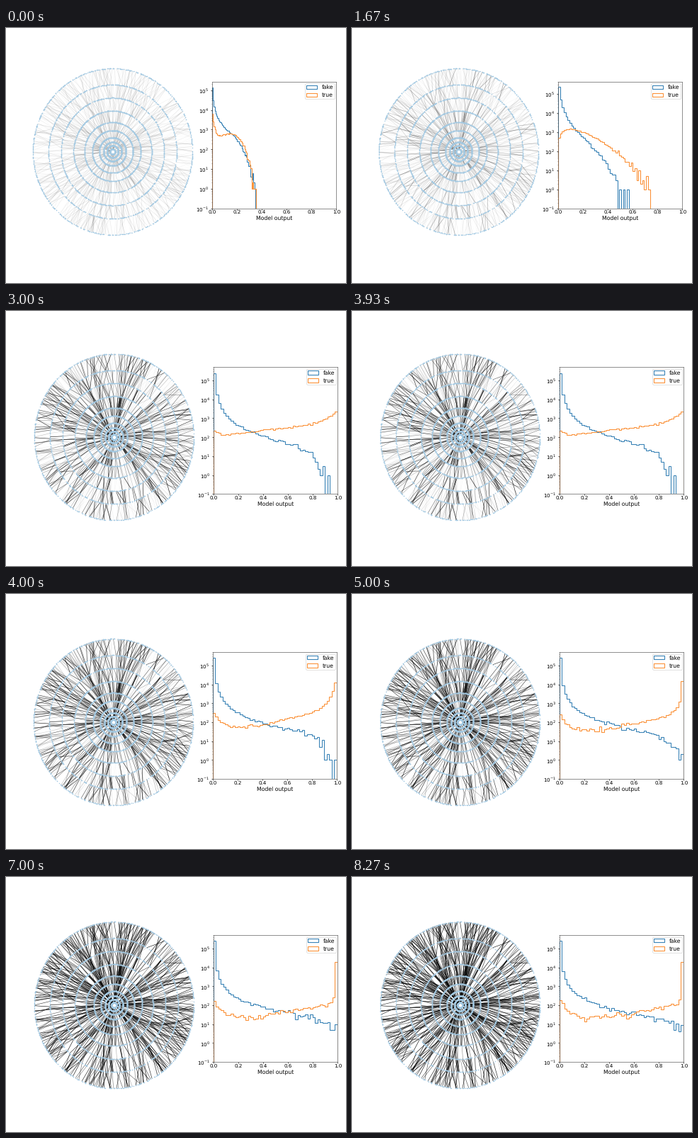
Animation, 480 px wide and 360 px high, one loop 8940 ms. Source, as a matplotlib script:

```python
import numpy as np
import matplotlib.pyplot as plt
from matplotlib.animation import FuncAnimation
from matplotlib.collections import LineCollection
from matplotlib.patches import Patch

W, H = 480, 360
STEP, FRAMES = 60, 149
EPOCHS, BINS = 9, 50

# At 72 dpi one point is one pixel.
plt.rcParams.update({
    "font.family": "DejaVu Sans", "font.size": 7.75, "text.hinting": "none",
    "xtick.labelsize": 7.1, "ytick.labelsize": 7.1,
    "axes.linewidth": 0.65, "axes.edgecolor": "#555555",
    "axes.labelpad": 0.8, "patch.linewidth": 0.7,
    "xtick.major.size": 1.6, "ytick.major.size": 1.6,
    "xtick.major.width": 0.65, "ytick.major.width": 0.65,
    "xtick.major.pad": 0.6, "ytick.major.pad": 3.0,
    "ytick.minor.size": 0.9, "ytick.minor.width": 0.4,
})

rng = np.random.default_rng(12)
bins = np.arange(BINS)
x = bins / (BINS - 1)


def fake_log(top, slope, rate, tail, power):
    """Logarithmic decay with a falling tail."""
    return top - slope * np.log10(1 + rate * bins) - tail * x ** power


def true_log(base, drop, width, rise, bow, end, power):
    """Early drop, slow rise and a strong term at the far end."""
    return (base + drop * np.exp(-bins / width)
            + rise * x ** bow + end * x ** power)


# Key epochs; the others are blended from their neighbours.
KEYS = {
    0: (fake_log(5.14, 1.4, 2, 2.75, 4.3),
        true_log(2.35, 1.45, 3, 1.6, 1, -4.4, 3.45)),
    1: (fake_log(5.34, 2.2, 1, 7.5, 3),
        true_log(3.25, -0.55, 2, 0, 1, -3.3, 1.9)),
    3: (fake_log(5.39, 1.88, 3, 4, 10),
        true_log(1.9, 0.5, 2, 0.8, 0.6, 0.65, 8)),
    4: (fake_log(5.43, 1.73, 5, 1.8, 10),
        true_log(1.6, 0.85, 4, 1.3, 1.6, 1.2, 20)),
    8: (fake_log(5.43, 1.55, 10, 0.6, 10),
        true_log(1.2, 1.1, 3.5, 0.9, 1.5, 2.2, 100)),
}


def histogram(epoch, kind):
    lo = max(k for k in KEYS if k <= epoch)
    hi = min(k for k in KEYS if k >= epoch)
    s = (epoch - lo) / max(hi - lo, 1)
    if lo >= 4:
        s = 1 - (1 - s) ** 2
    log = (1 - s) * KEYS[lo][kind] + s * KEYS[hi][kind]
    return np.maximum(rng.poisson(10 ** log), 1e-4)


counts = [[histogram(e, kind) for kind in (0, 1)] for e in range(EPOCHS)]
XMAX = [0.362, 0.77, 0.97] + [0.995] * 6
TOP = [5.43, 5.63] + [5.71] * 7
SHIFT = [(0, 0)] * 2 + [(2, 3.5)] * 2 + [(1, 6.4)] + [(2, 6.4)] * 4

RADII = np.array([32, 72, 116, 172, 260, 360, 500, 660, 820, 1020]) / 1020
LAYERS = len(RADII)
CX, CY, RX, RY = 150.5, 174.5, 112.5, 117.5
SECTOR = np.pi / 4
JETS = np.radians([4, 35, 80, 117, 124, 150, 195, 250, 318])


def xy(phi, r):
    return np.stack([CX + RX * r * np.cos(phi), CY - RY * r * np.sin(phi)], -1)


def edges(phi_a, phi_b, layer):
    """Segments between neighbouring layers that stay inside one sector."""
    keep = np.floor(phi_a / SECTOR) == np.floor(phi_b / SECTOR)
    a = xy(phi_a, RADII[layer])
    b = xy(phi_b, RADII[layer + 1])
    return np.stack([a, b], 1)[keep]


N = 480
jet = rng.choice(JETS, N) + rng.normal(0, 0.1, N)
phi0 = np.where(rng.random(N) < 0.35, jet, rng.uniform(0, 2 * np.pi, N))
bend = rng.normal(0, 0.3, N)
phi = phi0[:, None] + bend[:, None] * RADII + rng.normal(0, 0.006, (N, LAYERS))
tracks = []
for k in range(LAYERS - 1):
    kept = phi[rng.random(N) < 0.2 + 0.1 * k]
    tracks.append(edges(kept[:, k], kept[:, k + 1], np.full(len(kept), k)))
tracks = np.concatenate(tracks)

M = 3000
layer = (9 * rng.random(M) ** 0.7).astype(int)
start = rng.uniform(0, 2 * np.pi, M)
false = edges(start, start + rng.normal(0, 0.05, M), layer)
segs = np.concatenate([false, tracks])
u_false, u_track = rng.random(len(false)), rng.random(len(tracks))

extra = rng.uniform(0, 2 * np.pi, (260, LAYERS))
hits = np.concatenate([xy(phi, RADII), xy(extra, RADII)]).reshape(-1, 2)

fig = plt.figure(figsize=(W / 72, H / 72), dpi=72, facecolor="white")
graph = fig.add_axes([0, 0, 1, 1])
graph.set(xlim=(0, W), ylim=(H, 0))
graph.axis("off")
lines = graph.add_collection(LineCollection([], linewidths=0.6, zorder=1))
dots, = graph.plot([], [], "o", ms=1.45, mew=0, color="#a3c9e2", zorder=2)

ax = fig.add_axes([0.6, 0.3, 0.3, 0.5])
ax.set_yscale("log")
ax.set(xlim=(0, 1), xlabel="Model output")
grid = np.linspace(0, 1, BINS + 1)
STYLES = {"fake": "#3a83b6", "true": "#fb923a"}
steps = [ax.stairs(np.ones(BINS), grid, baseline=1e-4, color=c, lw=1.1)
         for c in STYLES.values()]
ax.legend(handles=[Patch(fill=False, ec=c, lw=1.1, label=name)
                   for name, c in STYLES.items()],
          loc="upper right", borderaxespad=0.35, borderpad=0.2,
          labelspacing=0.45)


def update(i):
    e = min((i * STEP + 40) // 1000, EPOCHS - 1)
    dx, dy = SHIFT[e]

    # Tracks darken and false edges fade as training goes on.
    gain, power = min(1, 0.15 + 0.28 * e), 7 * 0.68 ** e
    alpha = np.concatenate([0.14 * 0.7 ** e * u_false, gain * u_track ** power])
    seen = alpha > 0.004
    rgba = np.zeros((seen.sum(), 4))
    rgba[:, 3] = alpha[seen]
    lines.set_segments(segs[seen] + (dx, dy))
    lines.set_color(rgba)
    dots.set_data(hits[:, 0] + dx, hits[:, 1] + dy)

    ax.set_position([(290.8 + dx) / W, 1 - (254.7 + dy) / H,
                     175.6 / W, 179 / H])
    ax.set_ylim(0.1, 10 ** TOP[e])
    for patch, values in zip(steps, counts[e]):
        patch.set_data(values, grid * XMAX[e])
    return lines, dots, *steps


anim = FuncAnimation(fig, update, frames=FRAMES, interval=STEP,
                     repeat=True, repeat_delay=0, blit=False)
plt.show()
```
